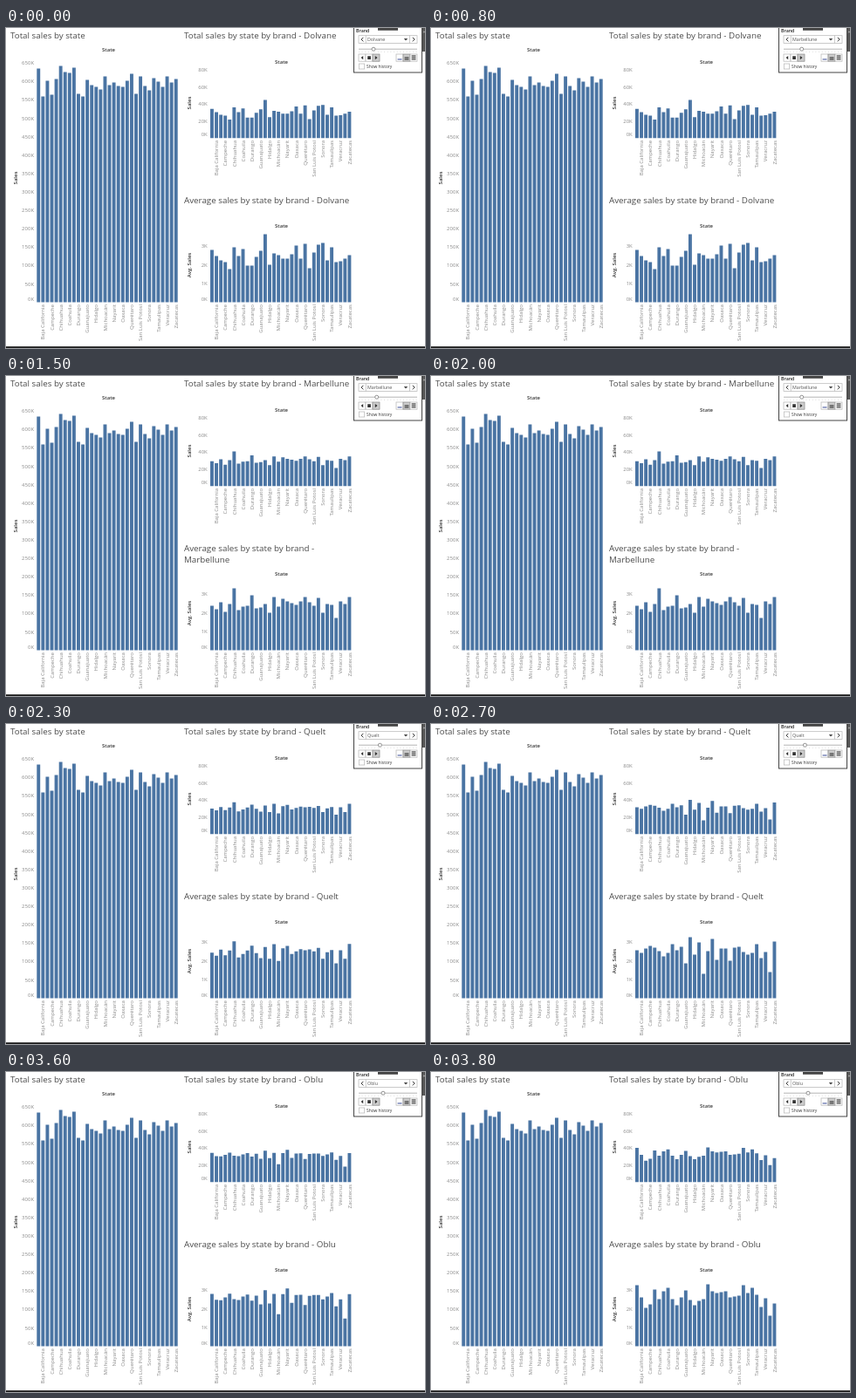
These frames come from a looping animation (480 px wide and 367 px high, 4 s). An HTML page:

```html
<!DOCTYPE html>
<html lang="en">
<head>
<meta charset="utf-8">
<title>Sales by state</title>
<style>
html, body { margin: 0; width: 100%; height: 100%; overflow: hidden; background: #fff; }
svg { display: block; width: 100%; height: 100%; font-family: "Open Sans", "Noto Sans", sans-serif; }
.title { font-size: 9.8px; fill: #4c4c4c; }
.head { font-size: 6px; font-weight: 600; fill: #333; text-anchor: middle; }
.tick { font-size: 6px; fill: #8a8a8a; text-anchor: end; }
.bars { fill: #4a74a3; }
.ui { font-size: 5.3px; fill: #555; }
.box { fill: #fff; stroke: #b4b4b4; stroke-width: .7; }
.arrow { fill: none; stroke: #333; stroke-width: 1; }
</style>
</head>
<body>
<svg id="stage" viewBox="0 0 480 367" preserveAspectRatio="none"></svg>
<script>
const stage = document.getElementById('stage');
const LOOP = 4000, STEP = 100, PITCH = 5.08;

const states = ['Baja California', 'Campeche', 'Chihuahua', 'Coahuila', 'Durango', 'Guanajuato',
  'Hidalgo', 'Michoacán', 'Nayarit', 'Oaxaca', 'Querétaro', 'San Luis Potosí', 'Sonora',
  'Tamaulipas', 'Veracruz', 'Zacatecas'];

// Bar heights in the total chart
const totals = [268, 236, 254, 238, 256, 271, 264, 263, 269, 239, 236, 255, 249, 247, 244, 259,
  249, 252, 248, 247, 254, 262, 239, 259, 248, 243, 257, 253, 247, 259, 252, 256];

// Bar heights in the average chart; brand sales share the same proportions
const brands = [
  { name: 'Dolvane', at: 0, knob: 421,
    bars: [60, 53, 48, 46, 38, 63, 53, 61, 42, 42, 52, 59, 78, 43, 56, 54,
      50, 50, 55, 65, 50, 67, 39, 57, 66, 68, 48, 63, 46, 47, 50, 54] },
  { name: 'Marbellune', at: 800, knob: 424.7, wrap: true,
    bars: [51, 47, 55, 44, 53, 71, 46, 50, 51, 63, 48, 49, 53, 43, 61, 50,
      59, 56, 54, 52, 56, 61, 55, 51, 60, 43, 53, 52, 37, 56, 53, 61] },
  { name: 'Quelt', at: 2200, knob: 428.4,
    bars: [55, 52, 57, 60, 58, 54, 48, 52, 62, 55, 59, 40, 70, 50, 64, 28,
      54, 68, 44, 57, 57, 43, 58, 59, 53, 50, 52, 62, 46, 53, 30, 65] },
  { name: 'Oblu', at: 3500, knob: 432,
    bars: [70, 56, 44, 48, 65, 54, 63, 67, 54, 47, 56, 64, 53, 47, 52, 54,
      71, 63, 61, 62, 63, 56, 57, 58, 70, 61, 67, 59, 45, 55, 35, 49] }
];

function add(tag, attrs, text) {
  const el = document.createElementNS('http://www.w3.org/2000/svg', tag);
  for (const key in attrs) el.setAttribute(key, attrs[key]);
  if (text) el.textContent = text;
  stage.appendChild(el);
  return el;
}
const label = (cls, x, y, text) => add('text', { class: cls, x, y }, text);
const upright = (cls, x, y, text) =>
  add('text', { class: cls, transform: `translate(${x} ${y}) rotate(-90)` }, text);
const rect = (x, y, width, height, attrs) => add('rect', { x, y, width, height, ...attrs });
const path = (d, attrs) => add('path', { d, ...attrs });

function barPath(x, base, heights) {
  return heights.map((h, i) =>
    `M${(x + i * PITCH).toFixed(2)} ${base}v${-h.toFixed(2)}h3.9v${h.toFixed(2)}z`).join('');
}

function chart(o) {
  label('head', o.mid, o.head, 'State');
  upright('head', o.axis, o.axisY, o.name);
  for (let i = 0; i <= o.count; i++) {
    const y = i ? o.base - i * o.gap : o.base - 4.2;
    label('tick', o.x - 3.2, y + 2.2, i * o.unit + 'K');
  }
  states.forEach((s, i) => upright('tick', o.x + PITCH * (2 * i + 1) + 4.1, o.base + 2.6, s));
  return path('', { class: 'bars' });
}

label('title', 5, 12, 'Total sales by state');
const brandTitle = label('title', 204, 12);
const avgTitle = label('title', 204, 200.5);
const avgWrap = label('title', 204, 213.8);

const total = chart({ x: 35.3, base: 314.5, mid: 117.5, head: 27.3, axis: 13.3, axisY: 172,
  name: 'Sales', count: 13, gap: 21.12, unit: 50 });
total.setAttribute('d', barPath(35.3, 314.5, totals));
const sales = chart({ x: 234, base: 126.3, mid: 315.5, head: 41.2, axis: 211.5, axisY: 86,
  name: 'Sales', count: 4, gap: 19.6, unit: 20 });
const average = chart({ x: 234, base: 314.5, mid: 315.5, head: 229.2, axis: 211.5, axisY: 272,
  name: 'Avg. Sales', count: 3, gap: 21.5, unit: 1 });

rect(0, 365.2, 480, 1.8, { fill: '#1c1c1c' });

// Brand control
rect(477, 0, 3, 27, { fill: '#555' });
path('M478 3.5l2 2M478 5.5l2-2', { stroke: '#ddd', 'stroke-width': .6 });
rect(398.5, -2, 78, 53, { fill: '#fff', stroke: '#444' });
rect(426, 0, 23, 2.8, { fill: '#444' });
label('ui', 401, 5.2, 'Brand').setAttribute('style', 'font-weight:600;fill:#222');
rect(404, 8.7, 67, 8.8, { class: 'box' });
path('M412.3 8.7v8.8M462.5 8.7v8.8', { stroke: '#b4b4b4', 'stroke-width': .7 });
path('M409.4 10.8l-2.3 2.3 2.3 2.3M465.8 10.8l2.3 2.3-2.3 2.3', { class: 'arrow' });
path('M455.8 12h4.4l-2.2 2.6z', { fill: '#444' });
const picked = label('ui', 414, 15);

path('M404 24.2h67', { stroke: '#b4b4b4', 'stroke-width': 1 });
path('M404 27.4h67', { stroke: '#ccc', 'stroke-width': .8, 'stroke-dasharray': '.8 2.85' });
const knob = add('circle', { cy: 24.2, r: 2, fill: '#fff', stroke: '#777', 'stroke-width': .8 });

for (let i = 0; i < 3; i++) {
  rect(404 + 8 * i, 30, 8, 8.2, { class: 'box', style: i === 2 ? 'fill:#ccc;stroke:#888' : '' });
  rect(447 + 8 * i, 30, 8, 8.2, { class: 'box', style: i === 1 ? 'fill:#ccc;stroke:#888' : '' });
  for (let j = 0; j <= i; j++)
    rect(448.6 + 8 * i, 35.4 - 2 * j, 4.9, 1.1, { fill: i ? '#333' : '#4a5aa0' });
}
path('M409.2 32v4.2l-2.6-2.1zM414.2 32.3h3.7v3.7h-3.7zM422.8 31.9v4.4l2.8-2.2z', { fill: '#333' });
rect(404.3, 41, 6.4, 6, { class: 'box' });
label('ui', 413, 46, 'Show history').setAttribute('style', 'font-size:4.9px;fill:#333');

function draw(now) {
  const t = Math.floor((now % LOOP) / STEP) * STEP;
  const index = brands.filter(b => b.at <= t).length - 1;
  const next = brands[index];
  const prev = brands[index - 1] || next;
  const p = Math.min(1, (t - next.at) / 300);
  const shown = p > 0 ? next : prev;
  const heights = next.bars.map((h, i) => prev.bars[i] + (h - prev.bars[i]) * p);

  sales.setAttribute('d', barPath(234, 126.3, heights.map(h => h * .56)));
  average.setAttribute('d', barPath(234, 314.5, heights));
  brandTitle.textContent = 'Total sales by state by brand - ' + shown.name;
  avgTitle.textContent = 'Average sales by state by brand -' + (shown.wrap ? '' : ' ' + shown.name);
  avgWrap.textContent = shown.wrap ? shown.name : '';
  picked.textContent = next.name;
  knob.setAttribute('cx', next.knob);
}

const start = performance.now();
function tick() {
  draw(performance.now() - start);
  requestAnimationFrame(tick);
}
tick();
</script>
</body>
</html>
```
